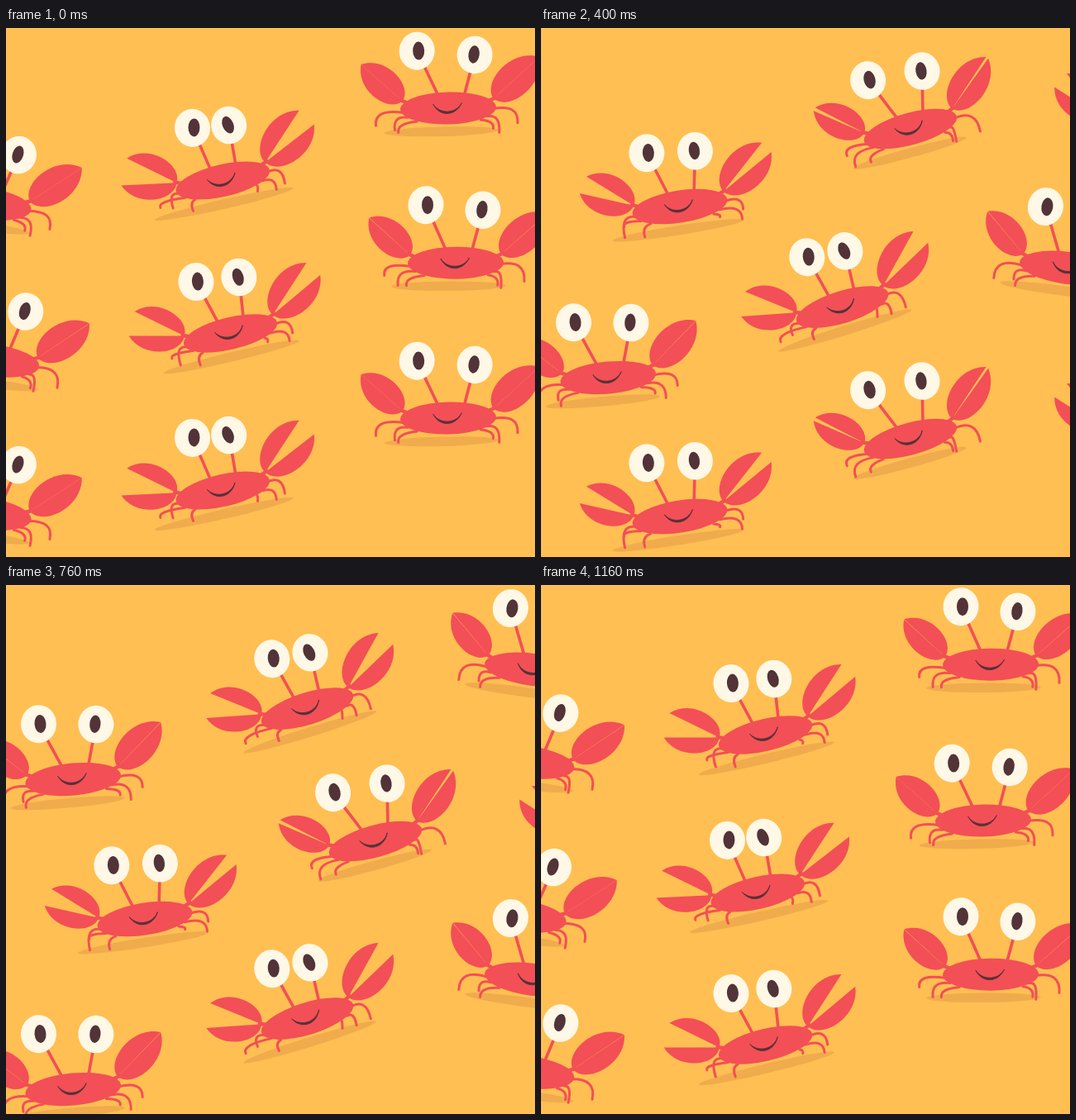
Write an HTML page with a canvas that moves like this. It is 640 by 640 pixels and loops after 1.2 s.

```html
<!DOCTYPE html>
<html lang="en">
<head>
<meta charset="utf-8">
<title>Crabs</title>
<style>
html, body { margin: 0; height: 100%; overflow: hidden; background: #ffbf52; }
canvas { display: block; width: 100vw; height: 100vh; }
</style>
</head>
<body>
<canvas width="640" height="640"></canvas>
<script>
const ctx = document.querySelector('canvas').getContext('2d');
const RED = '#f34f56', DARK = '#513338', CREAM = '#fff8e7', SAND = '#ffbf52', SHADE = '#f0ab4d';
const STEP = 40, LOOP = 30, CYCLE = 12, TURN = 2 * Math.PI, RAD = Math.PI / 180;

// Walking path: x, y, tilt in degrees, one key per step cycle
const FIRST = -24;
const PATH = [
  [759, 138, 12], [646, 104, 8], [535, 97, -1.5], [429, 128, -17], [318, 165.5, -15.5],
  [206, 203, -10], [91, 235, -6], [-27, 212, 8], [-141, 187, 12.5]
];

// Each foot circles its home spot: swing across, lift up, delay in steps
const LEGS = [
  { hip: [-54, 4], home: [-77, 19], swing: -11, lift: 9, delay: 0, knee: -6 },
  { hip: [-49, 10], home: [-73, 20], swing: 11, lift: -7, delay: 1.5, knee: -3 },
  { hip: [-38, 15], home: [-52, 28], swing: -9, lift: 2, delay: 0, knee: 2 },
  { hip: [54, 2], home: [78, 20], swing: 5.5, lift: -6, delay: 0, knee: -5 },
  { hip: [47, 11], home: [61, 28], swing: 13, lift: -3, delay: 3, knee: -2 },
  { hip: [39, 15], home: [46, 24], swing: 9, lift: -4, delay: 1, knee: 2 }
];

const mix = (a, b, t) => a + (b - a) * t;

// Catmull-Rom through the path keys
function place(u) {
  const s = (u - FIRST) / CYCLE, i = Math.floor(s), t = s - i;
  const key = n => PATH[Math.max(0, Math.min(PATH.length - 1, n))];
  return [0, 1, 2].map(c => {
    const [a, b, d, e] = [-1, 0, 1, 2].map(n => key(i + n)[c]);
    return b + t / 2 * (d - a + t * (2 * a - 5 * b + 4 * d - e + t * (3 * (b - d) + e - a)));
  });
}

function oval(x, y, rx, ry, fill, tilt = 0) {
  ctx.fillStyle = fill;
  ctx.beginPath();
  ctx.ellipse(x, y, rx, ry, tilt * RAD, 0, TURN);
  ctx.fill();
}

function line(x1, y1, x2, y2, width) {
  ctx.lineWidth = width;
  ctx.beginPath();
  ctx.moveTo(x1, y1);
  ctx.lineTo(x2, y2);
  ctx.stroke();
}

function leg({ hip, home, swing, lift, delay, knee }, phase) {
  const a = (phase - delay) / CYCLE * TURN;
  const x = home[0] + swing * Math.cos(a), y = home[1] + lift * Math.sin(a);
  ctx.lineWidth = 3;
  ctx.beginPath();
  ctx.moveTo(...hip);
  ctx.quadraticCurveTo(x + Math.sign(x) * 2, hip[1] + knee, x, y);
  ctx.stroke();
}

function jaw(side, angle, size, bulge) {
  ctx.save();
  ctx.translate(side * 55, -10);
  ctx.scale(side, 1);
  ctx.rotate(-angle * RAD);
  ctx.scale(size, bulge);
  ctx.beginPath();
  ctx.moveTo(0, 0);
  ctx.bezierCurveTo(3, -24, 50, -31, 67, 0);
  ctx.fill();
  ctx.restore();
}

function claws(open) {
  ctx.fillStyle = RED;
  jaw(-1, 43 - 4 * open, 1, .92);
  jaw(-1, 43 - 33 * open, 1, -.92);
  jaw(1, 41 + 3 * open, 1.12, 1);
  jaw(1, 41 - 16 * open, 1.12, -1);
  line(-57, -11, -43, -5, 4.5);
  line(57, -11, 43, -5, 4.5);
}

function eyes(lean) {
  const lx = mix(-36, -19.6, lean), rx = mix(33.8, 20.6, lean), ly = -70.3, ry = -63.7;
  line(lx, ly, -11, -14, 3.6);
  line(rx, ry, 19.5, -14, 3.6);
  oval(lx, ly, 21.5, 23, CREAM, 8);
  oval(rx, ry, 21.5, 22.8, CREAM, 4);
  oval(lx + 2, ly, 7, 11, DARK, 16 * lean);
  oval(rx - 1, ry - .5, 6.6, 10.8, DARK, 10 - 22 * lean);
}

function smile() {
  ctx.fillStyle = ctx.strokeStyle = DARK;
  ctx.lineWidth = .8;
  ctx.beginPath();
  ctx.moveTo(-18, -5);
  ctx.bezierCurveTo(-11, 10.5, 9, 10.5, 16.5, -6);
  ctx.bezierCurveTo(9, 7.3, -10, 7.3, -18, -5);
  ctx.fill();
  ctx.stroke();
}

function crab(u, top) {
  const [x, y, tilt] = place(u);
  const phase = (u + 4 * CYCLE) % CYCLE;
  const open = Math.abs(Math.sin(phase / CYCLE * Math.PI)) ** 3;
  const lean = Math.min(phase / 6.4, (CYCLE - phase) / 5.6) ** 2;
  ctx.save();
  ctx.translate(x, y + top);
  ctx.rotate(tilt * RAD);
  oval(-9 + 4 * open, 28, 69 + 17 * open, 5.8, SHADE);
  ctx.strokeStyle = RED;
  LEGS.forEach(l => leg(l, phase));
  claws(open);
  eyes(lean);
  oval(0, 0, 58, 19.5, RED);
  smile();
  ctx.restore();
}

function row(step, top) {
  for (let u = step - LOOP; u <= 72; u += LOOP) if (u >= FIRST) crab(u, top);
}

function draw(now) {
  const step = Math.floor(now / STEP) % LOOP;
  ctx.fillStyle = SAND;
  ctx.fillRect(0, 0, 640, 640);
  ctx.lineCap = ctx.lineJoin = 'round';
  row(step, 0);
  row(LOOP - 1 - step, 188);   // the middle row walks the same path backwards
  row(step, 375);
}

const start = performance.now();
function tick() {
  draw(performance.now() - start);
  requestAnimationFrame(tick);
}
tick();
</script>
</body>
</html>
```
